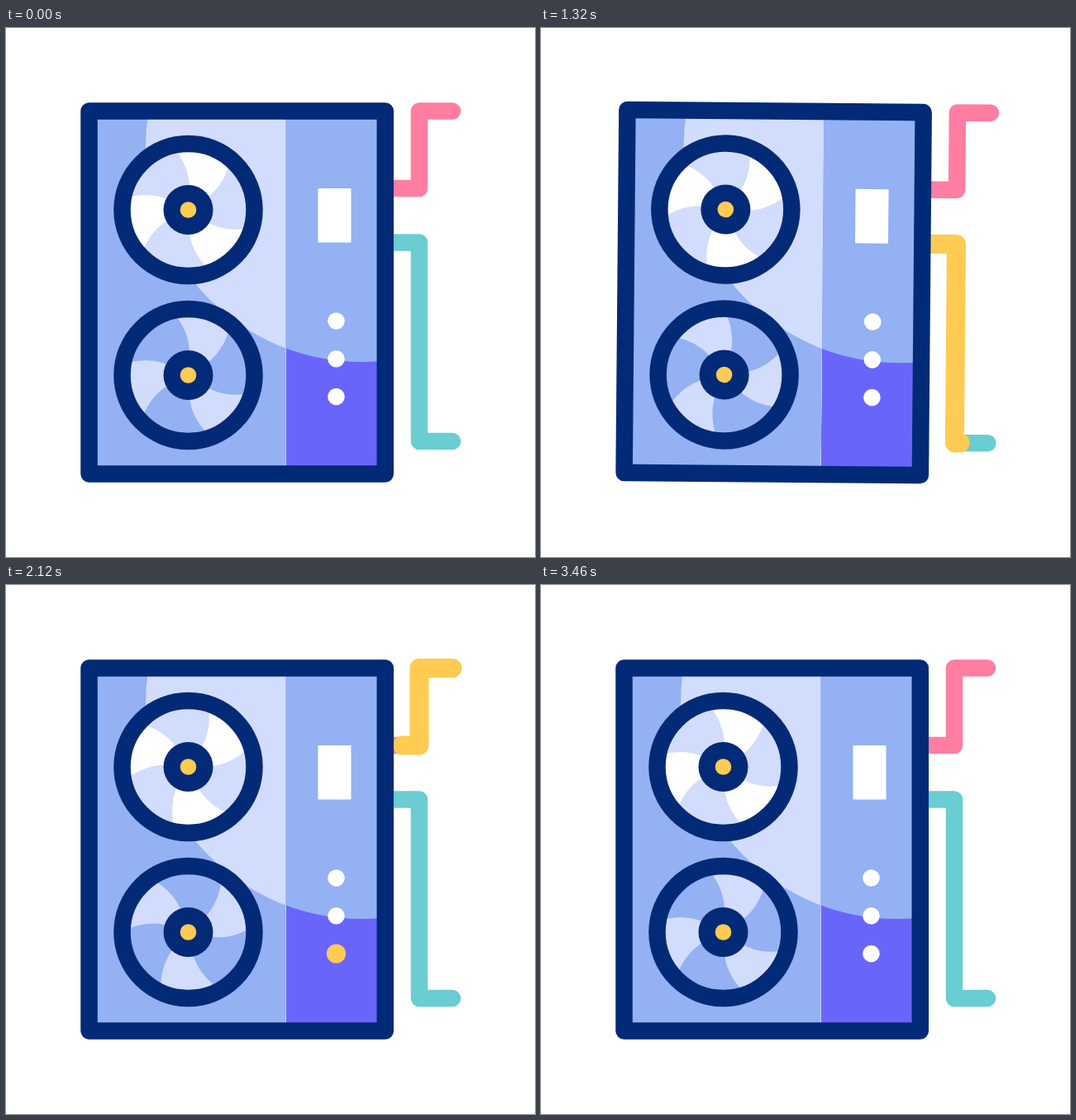
Animation of 640x640 px, one loop 3600 ms. Source, as an HTML page with a canvas:

```html
<!DOCTYPE html>
<html lang="en">
<head>
<meta charset="utf-8">
<title>Heat pump</title>
<style>
html, body { margin: 0; width: 640px; height: 640px; overflow: hidden; background: #fff; }
canvas { display: block; }
</style>
</head>
<body>
<canvas id="stage" width="640" height="640"></canvas>
<script>
const ctx = document.getElementById('stage').getContext('2d');
const LOOP = 3600;
const NAVY = '#032a76', BLUE = '#93b1f3', PALE = '#d2dcfd', VIOLET = '#6a65fa';
const YELLOW = '#ffcb52', PINK = '#ff7ea1', TEAL = '#69cdd1', WHITE = '#fff';

const rad = deg => deg * Math.PI / 180;
const clamp = (v, lo, hi) => Math.min(hi, Math.max(lo, v));
const smooth = u => u * u * (3 - 2 * u);

// Eased value along [time, value] keys
function eased(keys, t) {
  const i = keys.findIndex(k => k[0] > t);
  if (i === 0) return keys[0][1];
  if (i < 0) return keys[keys.length - 1][1];
  const [t0, v0] = keys[i - 1], [t1, v1] = keys[i];
  return v0 + (v1 - v0) * smooth((t - t0) / (t1 - t0));
}

// Smooth Hermite curve through [time, value] keys, at rest at both ends
function spline(keys, t) {
  const last = keys.length - 1;
  if (t <= keys[0][0]) return keys[0][1];
  if (t >= keys[last][0]) return keys[last][1];
  const slope = i => i === 0 || i === last ? 0
    : (keys[i + 1][1] - keys[i - 1][1]) / (keys[i + 1][0] - keys[i - 1][0]);
  const i = keys.findIndex(k => k[0] > t) - 1;
  const [t0, v0] = keys[i], [t1, v1] = keys[i + 1];
  const d = t1 - t0, u = (t - t0) / d, s = smooth(u);
  return v0 * (1 - s) + v1 * s
    + d * u * (1 - u) * ((1 - u) * slope(i) - u * slope(i + 1));
}

const HOP = [[100, 0], [440, -20], [1100, 0]];
const TILT = [[1020, 0], [1200, -1], [1380, 1], [1560, -1], [1740, 1], [1920, -1], [2100, 0]];
const SPIN = [[0, 0], [340, 105], [460, 147], [780, 339], [900, 482], [1380, 1256],
  [1500, 1464], [1900, 2203], [2020, 2430], [2580, 3296], [2700, 3391], [3240, 3600]];

const PIPES = [
  { color: PINK, from: 0, length: 173.5, points: [[540, 100.5], [500, 100.5], [500, 194], [460, 194]] },
  { color: TEAL, from: 173.5, length: 320.5, points: [[460, 259.5], [500, 259.5], [500, 500], [540, 500]] }
];

function disc(x, y, r, color) {
  ctx.fillStyle = color;
  ctx.beginPath();
  ctx.arc(x, y, r, 0, 2 * Math.PI);
  ctx.fill();
}

function box(x, y, w, h, color) {
  ctx.fillStyle = color;
  ctx.fillRect(x, y, w, h);
}

function strokePipe(pipe, color, width) {
  ctx.strokeStyle = color;
  ctx.lineWidth = width;
  ctx.beginPath();
  pipe.points.forEach(p => ctx.lineTo(...p));
  ctx.stroke();
}

function drawPipes(t) {
  PIPES.forEach(pipe => {
    strokePipe(pipe, pipe.color, 20.5);
    for (const start of [373, 1804]) {
      const age = t - start;
      const head = clamp(age * 0.486 - pipe.from, 0, pipe.length);
      const tail = clamp((age - 680) * 0.67 - pipe.from, 0, pipe.length);
      if (head <= tail) continue;
      ctx.setLineDash([head - tail, 999]);
      ctx.lineDashOffset = -tail;
      strokePipe(pipe, YELLOW, 23);
      ctx.setLineDash([]);
    }
  });
}

// One half of the cabinet, two-toned by a large circle
function panel(x, w, base, inner) {
  ctx.save();
  ctx.beginPath();
  ctx.rect(x, 105, w, 430);
  ctx.clip();
  box(x, 105, w, 430, base);
  disc(430, 143, 261, inner);
  ctx.restore();
}

function drawFan(y, angle, base, blade) {
  const polar = (r, deg) => [r * Math.cos(rad(deg)), r * Math.sin(rad(deg))];
  ctx.save();
  ctx.translate(220.5, y);
  disc(0, 0, 75, base);
  ctx.save();
  ctx.rotate(rad(angle));
  ctx.fillStyle = blade;
  for (const a of [-101, 19, 139]) {
    const b = a + 54;
    ctx.beginPath();
    ctx.moveTo(...polar(74, a - 1));
    ctx.quadraticCurveTo(...polar(50, a + 13), ...polar(26, a + 14));
    ctx.lineTo(...polar(26, b + 14));
    ctx.quadraticCurveTo(...polar(50, b + 13), ...polar(74, b - 1));
    ctx.arc(0, 0, 74, rad(b - 1), rad(a - 1), true);
    ctx.fill();
  }
  ctx.restore();
  ctx.strokeStyle = NAVY;
  ctx.lineWidth = 20.5;
  ctx.beginPath();
  ctx.arc(0, 0, 80, 0, 2 * Math.PI);
  ctx.stroke();
  disc(0, 0, 30, NAVY);
  disc(0, 0, 9.8, YELLOW);
  ctx.restore();
}

function drawLights(t) {
  const cycle = Math.floor((t - 460) / 900);
  const phase = t - 460 - cycle * 900;
  [354.5, 400.3, 446].forEach((y, i) => {
    const lit = cycle >= 0 && cycle < 3 && phase >= i * 200 && phase < i * 200 + 400;
    disc(399.5, y, lit ? 11.6 : 10.3, lit ? YELLOW : WHITE);
  });
}

function draw(t) {
  ctx.setTransform(1, 0, 0, 1, 0, 0);
  box(0, 0, 640, 640, WHITE);
  ctx.lineCap = ctx.lineJoin = 'round';
  ctx.translate(279.5, 550 + eased(HOP, t));
  ctx.rotate(rad(eased(TILT, t)));
  ctx.translate(-279.5, -550);

  drawPipes(t);
  panel(105, 233.5, BLUE, PALE);
  panel(338.5, 116, VIOLET, BLUE);
  ctx.strokeStyle = NAVY;
  ctx.lineWidth = 20.5;
  ctx.strokeRect(100.5, 100.5, 358.3, 439);
  drawFan(220, spline(SPIN, t - 100), PALE, WHITE);
  drawFan(420, spline(SPIN, t - 220), BLUE, PALE);
  box(377.5, 194, 40, 65.5, WHITE);
  drawLights(t);
}

const begin = performance.now();
function tick() {
  draw((performance.now() - begin) % LOOP);
  requestAnimationFrame(tick);
}
tick();
</script>
</body>
</html>
```
